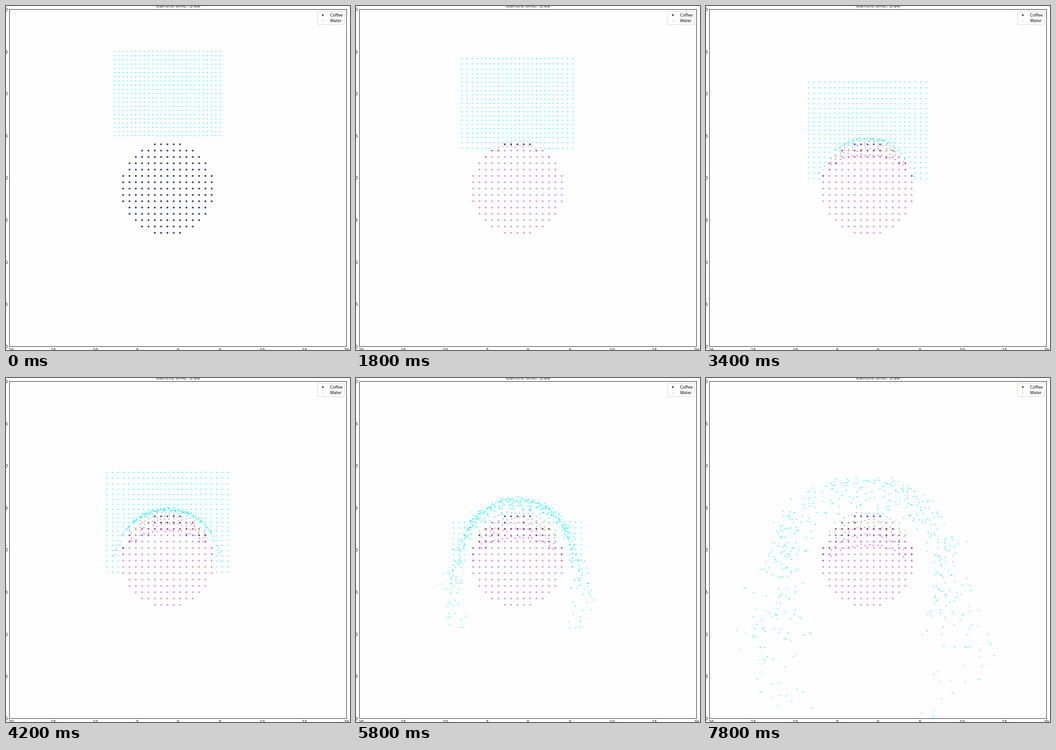
These frames come from a looping animation (748 px wide and 748 px high, 8000 ms). An HTML page with a canvas:

```html
<!DOCTYPE html>
<html lang="en">
<head>
<meta charset="utf-8">
<title>Coffee and water particles</title>
<style>
html, body { margin: 0; width: 100%; height: 100%; overflow: hidden; background: #fefefe; }
canvas { display: block; }
</style>
</head>
<body>
<canvas id="stage" width="748" height="748"></canvas>
<script>
const ctx = document.getElementById('stage').getContext('2d');
const STEPS = 40, STEP_MS = 200;
const COLS = 26, ROWS = 21, GAP = 9.167;
const CX = 351, CY = 397, GRAVITY = 0.588;
const BURST = 24, RELEASE = 29;
const FONT = '"DejaVu Sans", sans-serif';

const PALETTE = ('393b79 5254a3 6b6ecf 9c9ede 637939 8ca252 b5cf6b cedb9c 8c6d31 bd9e39 ' +
  'e7ba52 e7cb94 843c39 ad494a d6616b e7969c 7b4173 a55194 ce6dbd de9ed6')
  .split(' ').map(h => '#' + h);

// Rebound velocity by angle from the top of the disc: [degrees, vx, vy]
const REBOUND = [
  [-180, 0, 18], [-140, -2, 18], [-132, -9, 13], [-120, -12, 8.5], [-105, -14.5, 8],
  [-85, -13.5, 7], [-67, -10, 2], [-50, -10, -1], [-30, -11, -3.5], [-16, -5, -7.3],
  [12, 2, -7.4], [44, 5.5, -6.5], [58, 7, -2], [75, 7, 1], [90, 9, 3],
  [104, 12, 4], [123, 10.5, 9], [140, 1, 18], [180, 0, 18]
];

const clamp = (v, lo, hi) => Math.min(hi, Math.max(lo, v));
const mix = (a, b, t) => a + (b - a) * t;
const rand = i => {
  const s = Math.sin(i * 12.9898 + 4.1) * 43758.5453;
  return s - Math.floor(s);
};
const angleAt = (x, y) => Math.atan2(x - CX, CY - y);

function rebound(angle) {
  const deg = angle * 180 / Math.PI;
  let i = 1;
  while (i < REBOUND.length - 1 && REBOUND[i][0] < deg) i++;
  const a = REBOUND[i - 1], b = REBOUND[i];
  const t = (deg - a[0]) / (b[0] - a[0]);
  return { x: mix(a[1], b[1], t), y: mix(a[2], b[2], t) };
}

// Free fall of the block; its edges loosen first and the loosening moves inwards
function fall(c, k, n) {
  const m = Math.max(0, n - 2);
  const push = d => m ? 0.9 * m * Math.max(0, 1 - d / (0.52 * m)) ** 2 : 0;
  return {
    x: 236.4 + GAP * c - push(c) + push(COLS - 1 - c),
    y: 282.2 - GAP * k + 0.294 * n * (n - 1) + push(k) - push(ROWS - 1 - k)
  };
}

// Path of one water particle; k counts rows from the bottom
function track(c, k) {
  const id = c * ROWS + k;
  const r1 = rand(id), r2 = rand(id + 700), r3 = rand(id + 1400);
  const reach = 103 + 0.85 * k + 5 * (r1 - 0.5);
  const path = [];
  let mode = 'free', p, v = { x: 0, y: 0 }, start, hit, phi, rad, slide, accel, pull, tint = 0;

  function launch(n, wasHit) {
    const span = Math.max(1, RELEASE - n);
    const angle = angleAt(p.x + v.x * span * 0.8, p.y + v.y * span * 0.8);
    const out = rebound(angle);
    let w, base;
    if (wasHit) {
      // Inner layers slide along the disc, outer ones bounce off
      const lean = Math.abs(Math.sin(angle));
      const rank = (k - 4 + 3 * (r1 - 0.5)) / 14;
      const slip = 9 * lean;
      w = clamp(mix(rank, r2, 0.6 * lean), 0.02, 1);
      base = { x: Math.sign(angle) * slip * Math.max(0, Math.cos(angle)), y: slip * lean };
      pull = GRAVITY * mix(lean * lean, 1, w);
    } else {
      w = n >= RELEASE ? 0.45 + 0.55 * r2 : Math.pow(r2, 0.7);
      base = { x: 0, y: v.y + GRAVITY * span };
      pull = GRAVITY;
    }
    const goal = {
      x: mix(base.x, out.x, w) + 3.5 * (r3 - 0.5) * w,
      y: mix(base.y, out.y, w) + 2 * (r1 - 0.5) * w
    };
    accel = { x: (goal.x - v.x) / span, y: (goal.y - v.y) / span };
    start = n;
    mode = 'fly';
  }

  for (let n = 0; n < STEPS; n++) {
    if (mode === 'free') {
      p = fall(c, k, n);
      v = { x: 0, y: GRAVITY * n };
      if (n < RELEASE && p.y < 400 && Math.hypot(p.x - CX, p.y - CY) < reach) {
        phi = angleAt(p.x, p.y);
        rad = reach;
        slide = 0.9 * v.y * Math.abs(Math.sin(phi));
        hit = n;
        if (k < 5 && Math.abs(p.x - CX) < 86) {
          mode = 'soak';
          p.y = CY - Math.sqrt(reach * reach - (p.x - CX) ** 2);
          v = { x: p.x, y: p.y };
        } else {
          mode = 'shell';
          phi += 0.08 * (r3 - 0.5);
          p = { x: CX + rad * Math.sin(phi), y: CY - rad * Math.cos(phi) };
          v = { x: 0, y: 0 };
          if (n >= BURST) launch(n, true);
        }
      } else if (n >= RELEASE || (n >= BURST && p.y > 390)) {
        launch(n, false);
      }
    } else if (mode === 'soak') {
      const depth = (5 - 1.2 * k) * Math.pow(n - hit, 0.75);
      p = { x: v.x + 3 * (r2 - 0.5), y: v.y + depth + 4 * (r3 - 0.5) };
    } else if (mode === 'shell') {
      const dir = Math.sign(phi);
      phi += dir * slide / rad;
      rad += 0.3 * slide * Math.abs(Math.sin(phi));
      p = { x: CX + rad * Math.sin(phi), y: CY - rad * Math.cos(phi) };
      v = { x: dir * slide * Math.cos(phi), y: slide * Math.abs(Math.sin(phi)) };
      if (n >= BURST) launch(n, true);
    } else {
      const pushing = n - start <= Math.max(1, RELEASE - start);
      v = pushing ? { x: v.x + accel.x, y: v.y + accel.y } : { x: v.x, y: v.y + pull };
      p = { x: p.x + v.x, y: p.y + v.y };
    }
    if (hit !== undefined) {
      const top = mode === 'soak' ? 0.95 - 0.17 * k : Math.max(0.03, 0.3 - 0.03 * k);
      tint = top * (1 - Math.exp(-(n - hit + 0.5) / 2));
    }
    path.push({ x: p.x, y: p.y, tint });
  }
  return path;
}

const water = [];
for (let c = 0; c < COLS; c++)
  for (let k = 0; k < ROWS; k++) water.push(track(c, k));

const inDisc = (i, j) => i * i + j * j < 54;
const coffee = [];
for (let row = 0; row < 15; row++)
  for (let i = -7; i <= 7; i++) {
    if (!inDisc(i, row - 7)) continue;
    let first = 0;
    while (!inDisc(i, first - 7)) first++;
    coffee.push({ i, row, depth: row - first });
  }

function coffeeColor({ i, row, depth }, n) {
  if (n < 4) return PALETTE[0];
  const noise = rand(i * 31 + row * 7 + 90) - 0.5;
  if (row === 0) return PALETTE[n < 12 ? 0 : Math.round(1 + 2 * noise)];
  const since = n - 4 - 2 * row - 3 * depth;
  if (since <= 0) return PALETTE[19];
  const most = (18.5 - 0.26 * i * i) * Math.pow(0.42, depth);
  const lost = most * (1 - Math.exp(-since / (depth ? 6 : 8))) * (1 + 0.25 * noise);
  return PALETTE[clamp(Math.floor(19.5 - lost), 0, 19)];
}

function dot(x, y, r, color) {
  ctx.fillStyle = color;
  ctx.beginPath();
  ctx.arc(x, y, r, 0, 2 * Math.PI);
  ctx.fill();
}

function text(str, x, y, size, align) {
  ctx.font = size + 'px ' + FONT;
  ctx.textAlign = align;
  ctx.fillStyle = '#000';
  ctx.fillText(str, x, y);
}

function drawAxes() {
  ctx.strokeStyle = '#222';
  ctx.lineWidth = 1;
  ctx.strokeRect(7.5, 7.5, 733, 733);
  for (let i = 0; i <= 8; i++) {
    const value = -20 + 5 * i, at = 7.7 + 91.6 * i;
    text(String(value).replace('-', '\u2212'), at, 750.8, 8.6, 'center');
    text(String(-value).replace('-', '\u2212'), 4, at + 3.2, 8.6, 'right');
  }
  text('Current time: 5.00', 374, 2.8, 10.4, 'center');
}

function drawLegend() {
  ctx.fillStyle = 'rgba(255,255,255,0.8)';
  ctx.strokeStyle = '#d4d4d4';
  ctx.beginPath();
  ctx.roundRect(677.5, 12.5, 59, 28, 2);
  ctx.fill();
  ctx.stroke();
  dot(688.8, 19.8, 2, PALETTE[0]);
  dot(688.8, 32.5, 1.1, '#00ffff');
  text('Coffee', 704.5, 23, 8.6, 'left');
  text('Water', 704.5, 35.3, 8.6, 'left');
}

function draw(n) {
  ctx.fillStyle = '#fefefe';
  ctx.fillRect(0, 0, 748, 748);
  ctx.save();
  ctx.beginPath();
  ctx.rect(8, 8, 733, 733);
  ctx.clip();
  for (const g of coffee)
    dot(CX + 13.75 * g.i, 300.7 + 13.75 * g.row, 2.05, coffeeColor(g, n));
  for (const path of water) {
    const { x, y, tint } = path[n];
    const red = Math.round(255 * tint);
    dot(x, y, 1.15, `rgb(${red},${255 - red},255)`);
  }
  ctx.restore();
  drawAxes();
  drawLegend();
}

function tick() {
  draw(Math.floor(performance.now() / STEP_MS) % STEPS);
  requestAnimationFrame(tick);
}
tick();
</script>
</body>
</html>
```
